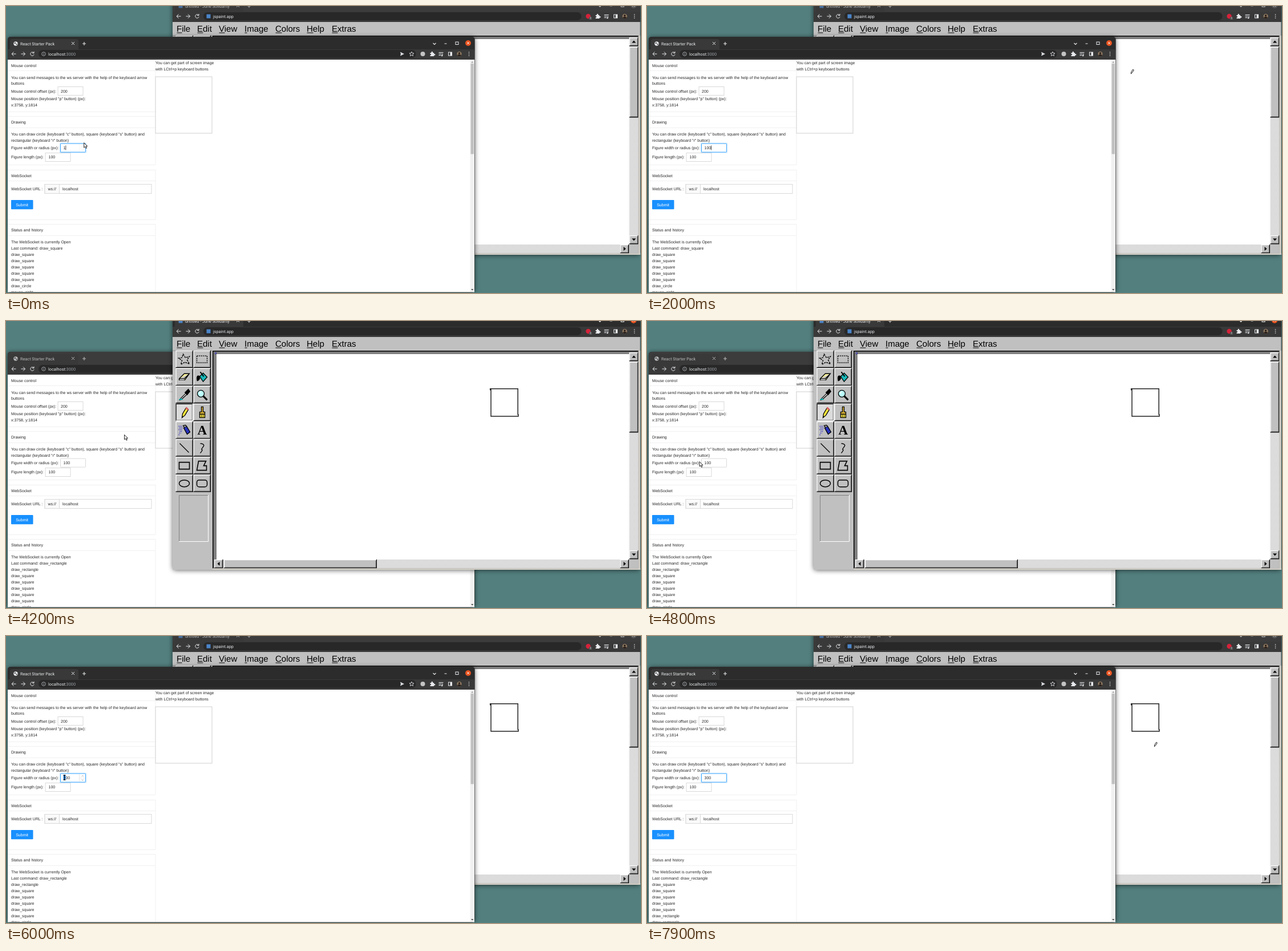
Animation of 1113 by 503 pixels, one loop 8000 ms. Source, as an HTML page:

```html
<!DOCTYPE html>
<html lang="en">
<head>
<meta charset="utf-8">
<title>Remote drawing demo</title>
<style>
  html, body { margin: 0; width: 100%; height: 100%; overflow: hidden; background: #53807f; }
  svg { display: block; width: 1113px; height: 503px; }
  text { font: 7px "Liberation Sans", Arial, sans-serif; fill: #262626; white-space: pre; text-rendering: geometricPrecision; }
  .ui { font: 7.3px Roboto, sans-serif; fill: #e8eaed; }
  .menu { font-size: 15px; fill: #000; }
  .shadow { filter: drop-shadow(0 1px 4px rgba(0, 0, 0, .6)); }
</style>
</head>
<body>
<svg id="stage" viewBox="0 0 1113 503" xmlns="http://www.w3.org/2000/svg"></svg>
<script>
const LOOP = 8000;
const rect = (x, y, w, h, fill, more = '') =>
  `<rect x="${x}" y="${y}" width="${w}" height="${h}" fill="${fill}" ${more}/>`;
const box = (x, y, w, h, stroke = '#d9d9d9', fill = '#fff', more = '') =>
  rect(x + .5, y + .5, w - 1, h - 1, fill, `stroke="${stroke}" ${more}`);
const line = (d, stroke = '#e8eaed', w = 1, fill = 'none', more = '') =>
  `<path d="${d}" stroke="${stroke}" stroke-width="${w}" fill="${fill}" ${more}/>`;
const shape = (d, fill) => `<path d="${d}" fill="${fill}"/>`;
const circle = (x, y, r, fill, more = '') => `<circle cx="${x}" cy="${y}" r="${r}" fill="${fill}" ${more}/>`;
const text = (x, y, s, more = '') => `<text x="${x}" y="${y}" ${more}>${s}</text>`;
const at = (x, y, body, more = '') => `<g transform="translate(${x} ${y})" ${more}>${body}</g>`;

// Browser frame: x, y is the outer corner, all controls hang off its two edges.
function browser(id, x, y, w, h, title, favicon, address, extension) {
  const r = w;
  const tabs =
    line('M112 9l5 5M117 9l-5 5') + line('M131 12h6M134 9v6', '#e8eaed', 1.1) +
    line(`M${r - 73} 11l2.5 2.5 2.5-2.5`, '#e8eaed', 1.2) + line(`M${r - 53} 12h4`) +
    box(r - 34, 8.5, 6, 5.5, '#e8eaed', 'none');
  const bar =
    line('M14.500 30h-7M10.500 26.500l-3.500 3.500 3.500 3.500M23.500 30h7M27 26.500l3.500 3.500-3.500 3.500') +
    line('M45.500 28a3.200 3.200 0 1 0 .6 2.800M46 25.800v2.700h-2.800') +
    rect(54, 23, r - 157, 14, '#282828', 'rx="7"') + address + extension +
    shape(`M${r - 78} 28h2v-1a1.300 1.300 0 0 1 2.600 0v1h2v2h1a1.300 1.300 0 0 1 0 2.600h-1v1.400h-6.600v-2h.6a1 1 0 0 0 0-2h-.6z`, '#e8eaed') +
    line(`M${r - 63} 27.500h8M${r - 63} 30h5M${r - 63} 32.500h4M${r - 56.500} 29v4`) + circle(r - 57.3, 33, 1.2, '#e8eaed') +
    box(r - 46.5, 26.5, 7, 7, '#e8eaed', 'none') + rect(r - 43, 27, 3, 6, '#e8eaed') +
    circle(r - 27, 30, 4.2, '#8c765f') + circle(r - 27, 28.8, 1.7, '#2b211c') +
    shape(`M${r - 30.5} 32.500q3.500-4 7 0q-3.500 3.500-7 0`, '#2b211c') +
    [27, 30, 33].map(v => circle(r - 10, v, .8, '#e8eaed')).join('');
  return at(x, y,
    rect(0, 0, w, h, '#2c2c2c', 'class="shadow" rx="5"') +
    `<path id="${id}Strip" d="M0 24V5q0-5 5-5H${w - 5}q5 0 5 5V24z"/>` +
    `<path id="${id}Tab" d="M0 24q4 0 4-4V8q0-4 4-4H120q4 0 4 4V20q0 4 4 4z" fill="#393939"/>` +
    rect(0, 22, w, 18, '#393939') +
    `<g id="${id}Labels">` + favicon + text(22, 14.6, title, 'class="ui"') + tabs + '</g>' +
    `<circle id="${id}Close" cx="${r - 11.5}" cy="11" r="5"/>` +
    line(`M${r - 13.300} 9.200l3.600 3.600M${r - 9.700} 9.200l-3.600 3.600`, '#fff', .9) + bar);
}

const globe = circle(14, 12, 3.7, '#e8eaed') + shape('M11.500 10.500l2-1 .5 2-1.500 1zM15 12l2 .5-1.500 2-1-1z', '#3a3a3a');

function webPage() {
  const card = (top, head, bottom) =>
    line(`M3 ${top}.500H262M3 ${head}.500H262M3 ${bottom}.500H262M262 ${top}V${bottom}`, '#f0f0f0');
  const labels = [
    [9, 106.5, 'Mouse control'],
    [9, 127.5, 'You can send messages to the ws server with the help of the keyboard arrow'],
    [9, 138.3, 'buttons'], [9, 151.6, 'Mouse control offset (px):'], [96, 151.6, '200'],
    [9, 165, 'Mouse position (keyboard "p" button) (px):'], [9, 176, 'x:3758, y:1814'],
    [9, 206, 'Drawing'],
    [9, 227, 'You can draw circle (keyboard "c" button), square (keyboard "s" button) and'],
    [9, 238, 'rectangular (keyboard "r" button)'], [9, 251.2, 'Figure width or radius (px):'],
    [9, 267.2, 'Figure length (px):'], [74.5, 267.2, '100'],
    [9, 299.5, 'WebSocket'], [9, 323, 'WebSocket URL :'], [73.5, 323, 'ws://'], [99, 323, 'localhost'],
    [9, 395, 'Status and history'], [9, 416, 'The WebSocket is currently Open'],
    [262, 102.2, 'You can get part of screen image'], [262, 113, 'with LCtrl+p keyboard buttons']
  ];
  const spinner = line('M128.500 242V256M129 249H139', '#d9d9d9', .6) +
    line('M132.500 246.200l1.700-1.700 1.700 1.700M132.500 251.500l1.700 1.700 1.700-1.700', '#8c8c8c', .7);
  return rect(3, 94, 818, 407.5, '#fff') +
    '<svg x="3" y="94" width="818" height="407" viewBox="3 94 818 407">' +
    card(94, 113, 185) + card(193, 213, 278) + card(287, 306, 374) + card(382, 402, 520) +
    box(90.5, 141, 45, 16) + box(68.5, 257, 45, 16) +
    box(67.5, 312, 188, 17) + box(67.5, 312, 26.5, 17, '#d9d9d9', '#fafafa') +
    rect(9, 340, 38.5, 16.3, '#1890ff', 'rx="1"') + text(17.2, 350.7, 'Submit', 'style="fill:#fff"') +
    box(261.5, 123.5, 100, 100, '#d0d0d0') +
    rect(94, 239.8, 47, 18, '#1890ff', 'id="glow" rx="1.5" opacity=".2"') +
    box(95, 240.6, 45, 16, '#d9d9d9', '#fff', 'id="field" rx="1"') +
    `<g id="spinner">${spinner}</g>` +
    rect(100.5, 244, 4, 8.5, '#1890ff', 'id="selection"') +
    text(100.5, 251.2, '', 'id="width"') + rect(0, 244.5, .7, 8, '#000', 'id="caret"') +
    labels.map(l => text(...l)).join('') +
    Array.from({ length: 8 }, (_, i) => text(9, 427 + 10.93 * i, '', 'class="log"')).join('') +
    rect(813.5, 94, 7.5, 408, '#f1f1f1') + rect(814.5, 101, 5.5, 158.5, '#c1c1c1') +
    shape('M815 99.500h4.500l-2.250-2.500z', '#a3a3a3') + shape('M815 496h4.500l-2.250 2.500z', '#505050') + '</svg>';
}

const bevel = (x, y, w, h, down) => {
  const [lit, dark] = down ? ['#000', '#fff'] : ['#fff', '#000'];
  return rect(x, y, w, h, down ? 'url(#dither)' : '#c0c0c0') +
    line(`M${x + 1.700} ${y + h - 1.700}H${x + w - 1.700}V${y + 1.700}`, '#808080', 1.3) +
    line(`M${x + .6} ${y + h}V${y + .6}H${x + w}`, lit, 1.2) +
    line(`M${x} ${y + h - .6}H${x + w - .6}V${y}`, dark, 1.2);
};

// Toolbox icons, centred on 0,0 and listed row by row.
const ink = (d, fill = 'none', w = 1.3) => line(d, '#000', w, fill);
const tools = [
  ink('M-2-9L2-3 9-5 5 1 9 8 1 5-6 9-4 2-10-2-4-3z', 'none', 1.4).replace('/>', ' stroke-dasharray="3 1.3"/>'),
  ink('M-9-6H9V6H-9z').replace('/>', ' stroke-dasharray="2.3 1.3"/>'),
  ink('M-9 3L0-6H9L1 5H-9zM-9 3H0L9-6', '#fff59a') + shape('M-8 3.500H0V5H-8z', '#fff'),
  ink('M-4-1L2-7 9 0 2 8z', '#18b8b8') + ink('M-4-1Q-10-4-8 6Q-5 5-4 1M-3-9L3-1', '#000', 2),
  ink('M3-3L-7 7-8 9-5 8 5-1', '#fff') + ink('M2-4L7-9 9-6 5-1z', '#000', 2.5) + shape('M-10 9q4-5 8 0z', '#00b8b8'),
  ink('M2 2L9 9', 'none', 3) + circle(-2, -2, 6, '#bff', 'stroke="#000" stroke-width="1.3"') + line('M-5-2a4 4 0 0 1 3-3', '#fff', 1.5),
  ink('M-4 9L-3 2 3-8 7-5 1 5z', '#ffeb3b') + shape('M2-7L4-10 8-6 6-4z', '#d66') + shape('M-4 9l.5-3 2 1z', '#000'),
  ink('M-1-10H2V-1H5V3H-4V-1H-1z', '#e2b93a') + ink('M-4 3H5V9H-4z', '#f4df43') + line('M-1 4V8M2 4V8', '#000', .8),
  ink('M-1-4L4-7 10 3 5 7z', '#2733bd') + ink('M0-5L-2-8 2-9 4-7', '#aaa') +
    line('M-10-7H-3M-9-4H-3M-10-1H-4M-8 2H-4M-9 5H-6M-10 8H-8', '#2020c0', 1.4, 'none', 'stroke-dasharray="1.2 1.2"'),
  text(-8, 8, 'A', 'style="font:bold 23px Liberation Serif,serif;fill:#000"'),
  ink('M-8-8L8 8'),
  ink('M-3-8Q6-7 2-2T0 3T-3 9'),
  ink('M-9-6H9V6H-9z', 'none', 1.6),
  ink('M-6-8H7L3 0H8V8H-9z', 'none', 1.6),
  '<ellipse rx="9" ry="6" fill="none" stroke="#000" stroke-width="1.5"/>',
  rect(-9, -6, 18, 12, 'none', 'rx="4" stroke="#000" stroke-width="1.5"')
];

function paintApp() {
  const menu = [[299, 'File', 9], [335, 'Edit', 10], [373, 'View', 10], [418, 'Image', 4],
    [472, 'Colors', 11], [527, 'Help', 11], [571, 'Extras', 10]];
  const arrow = (x, y, turn) => `<path d="M-3.500 2H3.500L0-2z" transform="translate(${x} ${y}) rotate(${turn})"/>`;
  const toolbox = tools.map((icon, i) => {
    const col = i % 2, row = i >> 1, y = 51.7 + 31.07 * row;
    return bevel(297.5 + 31 * col, y, 30.6, 30.6, i === 6) + at(312.5 + 31 * col, y + 15.5, icon);
  }).join('');
  return rect(292, 28, 819.5, 408, '#c0c0c0') +
    menu.map(([x, s, w]) => text(x, 45.2, s, 'class="menu"') + rect(x + .5, 46.5, w, 1, '#000')).join('') +
    line('M292 52H361', '#808080', .8) + toolbox +
    line('M303.500 386V305.500H354', '#808080') + line('M303 386.500H354.500V305', '#fff') +
    rect(362, 52, 748, 382, '#000') + rect(363.5, 53.5, 746, 380.5, '#808080') +
    rect(369, 58, 724, 360, '#fff') + rect(366, 55, 3, 3, '#000080') + rect(366.7, 55.7, 1.5, 1.5, '#fff') +
    rect(1092.5, 55, 16, 363, 'url(#dither)') + rect(365, 418, 728, 15.5, 'url(#dither)') +
    rect(1092.5, 418, 16, 15.5, '#c0c0c0') +
    bevel(1092.5, 55, 16, 15.5) + bevel(1092.5, 71.5, 16, 124) + bevel(1092.5, 402, 16, 15.5) +
    bevel(365, 418, 15.5, 15.5) + bevel(382, 418, 268, 15.5) + bevel(1076.5, 418, 15.5, 15.5) +
    arrow(1100.5, 62.5, 0) + arrow(1100.5, 409.5, 180) + arrow(372.5, 425.5, -90) + arrow(1084.5, 425.5, 90) +
    rect(1108.5, 52, 3, 384, '#d4d0c8') + rect(362, 433.5, 749.5, 2.5, '#d4d0c8') +
    line('M848.700 121.500V118.700H897.200V164H898V167H850V119', '#222', 1.5, 'none', 'id="ink" pathLength="4.1"');
}

const stage = document.getElementById('stage');
const appIcon = (x, y) => rect(x - 3.5, y - 3.5, 7, 7, '#4a84c8');
stage.innerHTML =
  '<defs><pattern id="dither" width="2" height="2" patternUnits="userSpaceOnUse">' +
  rect(0, 0, 2, 2, '#fff') + rect(0, 0, 1, 1, '#b8b8b8') + rect(1, 1, 1, 1, '#b8b8b8') + '</pattern></defs>' +
  rect(0, 0, 1113, 503, '#53807f') +
  '<g id="paint">' + browser('paint', 292, -12, 819.5, 448, 'untitled - June Solidarity', appIcon(14, 12),
    appIcon(63, 30) + text(71, 32.6, 'jspaint.app', 'class="ui"'),
    circle(728.5, 30, 4.2, '#d5223a') + rect(730, 31, 5, 5, '#555', 'rx="1"') +
    text(731.2, 35.4, '1', 'class="ui" style="font-size:5px"')) + paintApp() + '</g>' +
  '<g id="web">' + browser('web', 3, 54, 818.5, 448, 'React Starter Pack', globe,
    circle(63, 30, 3.3, 'none', 'stroke="#bdc1c6" stroke-width=".8"') + line('M63 29.500v2.300M63 28v.8', '#bdc1c6', .8) +
    text(71, 32.6, 'localhost:<tspan fill="#9aa0a6">3000</tspan>', 'class="ui"') +
    shape('M688 26.500l7 3.500-7 3.500 1-3.500z', '#dadce0') +
    line('M708 26l1.100 2.600 2.900.2-2.200 1.900.7 2.800-2.500-1.500-2.500 1.500.7-2.800-2.200-1.900 2.900-.2z', '#dadce0', .9),
    circle(727.5, 30, 4, '#c4c4c4')) + webPage() + '</g>' +
  '<g id="cursor">' +
  line('M0 0V8.500L2 6.700 3.400 9.800 4.900 9.100 3.500 6.100H6z', '#111', .9, '#fff', 'id="arrow"') +
  line('M0 0L.4-3 3.300-7.600 5-6.500 2-1.800z', '#000', .9, '#fff', 'id="pencil"') +
  line('M-1.800-4H1.800M0-4V4M-1.800 4H1.800', '#111', 1.4, 'none', 'id="beam"') + '</g>';

const $ = id => document.getElementById(id);
const show = (id, on) => $(id).setAttribute('visibility', on ? 'visible' : 'hidden');
const put = (id, name, value) => $(id).setAttribute(name, value);
const latest = (track, t) => track.reduce((found, key) => key[0] <= t ? key : found);

const pointer = [
  [0, 136.7, 239.7, 'arrow'],
  [1400, 150, 236], [1500, 225, 203], [1600, 370, 150], [1700, 540, 103],
  [1800, 700, 80.5], [1900, 800, 92], [2000, 848.3, 118.8, 'pencil'],
  [4000, 454.3, 158, 'pencil'], [4200, 207.5, 199.3], [4300, 160, 216], [4400, 132, 230],
  [4500, 115, 240], [4600, 103, 246], [4700, 96, 247], [4800, 92, 246.5],
  [5000, 97, 248, 'beam'], [5100, 100.5, 248, 'beam'], [5200, 102.5, 248, 'beam'],
  [5400, 103.3, 248.5, 'beam'], [5500, 104, 248.5, 'beam'], [5700, 104.7, 248, 'beam'],
  [6000, 102.5, 248, 'beam'], [6500, 130, 249, 'beam'], [6600, 160.5, 249],
  [7300, 230, 232], [7400, 530, 150], [7500, 787, 95],
  [7700, 815, 60.5], [7800, 862, 130, 'pencil'], [7900, 889.3, 193.8, 'pencil']
];
// Progress of the pencil around the square, in sides.
const strokes = [[0, 0], [3000, 1], [3100, 1.3], [3200, 1.6], [3300, 1.85], [3400, 2], [3600, 2.6], [3700, 3.3], [3800, 4]];
const corners = [[848.3, 118.8], [897.3, 118.8], [897.3, 167], [850, 167], [848.3, 118.8]];
const typed = [[0, '1'], [700, '10'], [800, '100'], [6800, '300']];
const squares = Array(5).fill('draw_square');
const logs = [
  [0, ['Last command: draw_square', ...squares, 'draw_circle', 'mouse_right']],
  [3800, ['Last command: draw_rectangle', 'draw_rectangle', ...squares, 'draw_circle']],
  [6800, ['Last command: draw_rectangle', ...squares, 'draw_rectangle', 'draw_rectangle']]
];
const spin = [[0, .3], [200, 0], [5000, .35], [5100, .7], [5200, 1], [6600, .5], [6800, 0]];

function along(p) {
  const i = Math.min(3, Math.floor(p)), f = p - i;
  return corners[i].map((v, k) => v + (corners[i + 1][k] - v) * f);
}

function setActive(id, active) {
  put(id + 'Strip', 'fill', active ? '#2c2c2c' : '#3c3c3c');
  put(id + 'Labels', 'opacity', active ? 1 : .72);
  put(id + 'Close', 'fill', active ? '#e95420' : '#5a5a5a');
}

function render(t) {
  const paintFront = t >= 3000 && t < 6000;
  const front = $(paintFront ? 'paint' : 'web');
  if (front.nextElementSibling !== $('cursor')) stage.insertBefore(front, $('cursor'));
  setActive('paint', paintFront);
  setActive('web', !paintFront);

  const progress = latest(strokes, t)[1];
  show('ink', progress > 0);
  put('ink', 'stroke-dasharray', `${progress && progress + .1} 9`);
  put('ink', 'stroke-width', progress > 1 ? 1.5 : 1.1);

  let [, x, y, kind = 'arrow'] = latest(pointer, t);
  if (t >= 3000 && t < 4000) [x, y] = along(progress);
  put('cursor', 'transform', `translate(${x} ${y})`);
  for (const id of ['arrow', 'pencil', 'beam']) show(id, id === kind);

  const value = latest(typed, t)[1], selected = t >= 6000 && t < 6800;
  const hover = t >= 5000 && t < 6000;
  $('width').innerHTML = selected ? '<tspan fill="#fff">1</tspan>00' : value;
  show('selection', selected);
  show('glow', !paintFront);
  put('field', 'stroke', paintFront && !hover ? '#d9d9d9' : '#40a9ff');
  put('spinner', 'opacity', latest(spin, t)[1]);
  show('caret', t < 3000 || (t >= 6800 && t < 7300));
  put('caret', 'x', 100.6 + 3.9 * (t < 3000 ? value.length : 1));

  const rows = latest(logs, t)[1];
  document.querySelectorAll('.log').forEach((row, i) => { row.textContent = rows[i]; });
}

function tick() {
  render(performance.now() % LOOP);
  requestAnimationFrame(tick);
}
tick();
</script>
</body>
</html>
```
